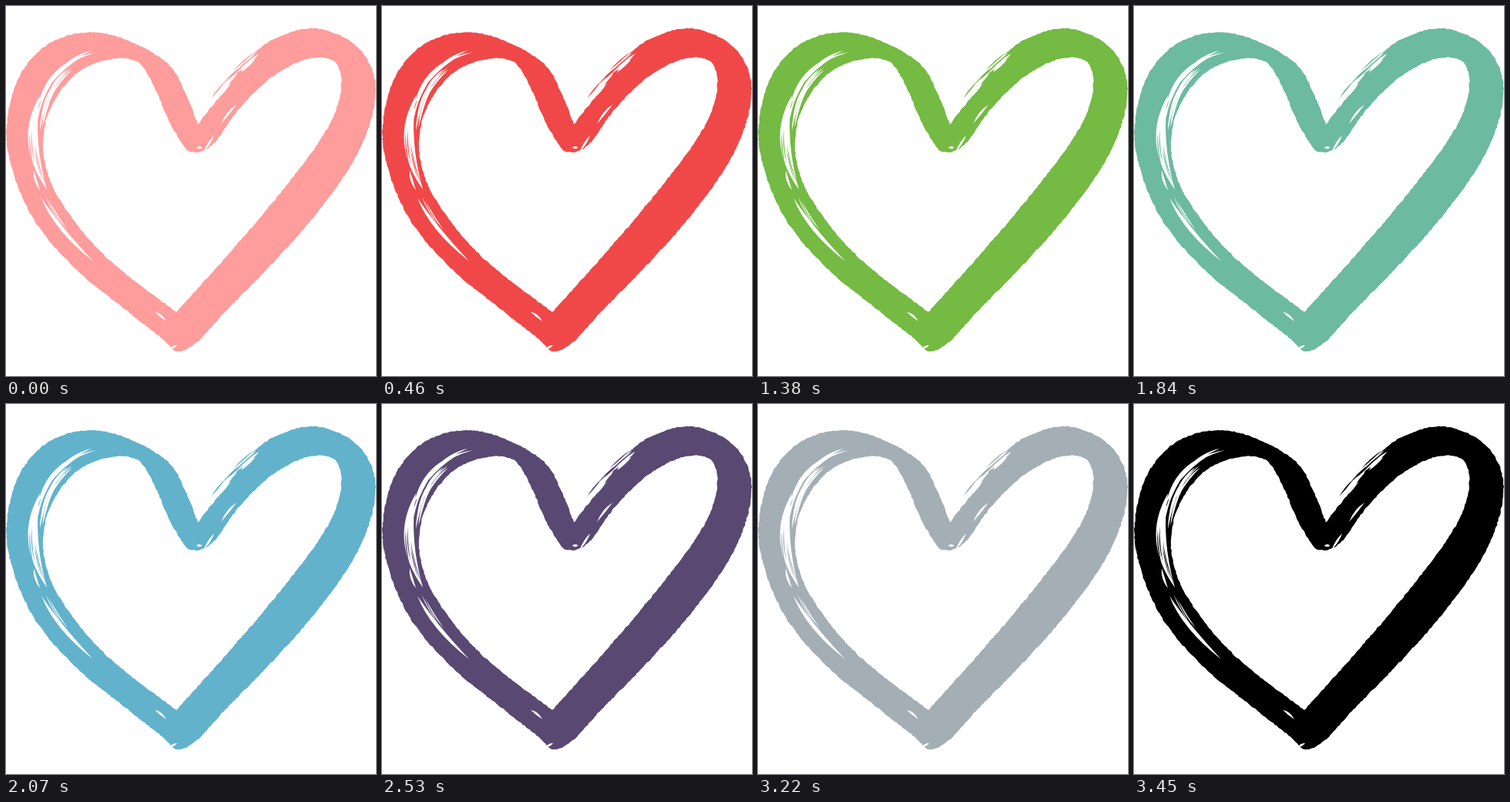
Write an HTML page with a canvas that moves like this. It is 480x480 px and loops after 3680 ms.

```html
<!DOCTYPE html>
<html lang="en">
<head>
<meta charset="utf-8">
<title>Brush heart</title>
<style>
html, body { margin: 0; width: 100%; height: 100%; overflow: hidden; background: #fff; }
canvas { display: block; width: 480px; height: 480px; }
</style>
</head>
<body>
<canvas id="stage" width="480" height="480"></canvas>
<script>
const ctx = document.getElementById('stage').getContext('2d');
const STEP = 230;
const COLORS = [
  '#ff9c9c', '#ff7474', '#f04848', '#f8603c',
  '#ff812d', '#ffc23a', '#74ba43', '#4fa35a',
  '#6cbaa0', '#62b2cc', '#4a78b4', '#594872',
  '#8c6aa6', '#b490a8', '#a3afb5', '#000000'
];

// Key points of the two edges; a repeated point makes a sharp corner.
const OUTER = [
  [249, 153], [249, 153], [280, 114], [318, 65], [352, 41], [398, 29], [446, 45],
  [475, 82], [477, 133], [453, 197], [403, 269], [340, 340], [285, 396], [248, 436],
  [222, 448], [203, 432], [150, 390], [90, 341], [38, 280], [8, 212], [1, 155],
  [17, 92], [57, 48], [115, 34], [170, 50], [212, 77], [232, 111]
];
const INNER = [
  [243, 190], [230, 181], [211, 148], [196, 113], [182, 86], [168, 71], [135, 69],
  [92, 87], [59, 130], [48, 178], [57, 226], [82, 270], [118, 314], [162, 353],
  [221, 397], [221, 397], [268, 345], [330, 274], [395, 192], [426, 140], [435, 97],
  [424, 71], [390, 69], [344, 93], [302, 134], [268, 180]
];

let seed = 41;
function rand(min, max) {
  seed = (seed * 16807) % 2147483647;
  return min + (max - min) * seed / 2147483647;
}

function spline(a, b, c, d, u) {
  return 0.5 * (2 * b + (c - a) * u + (2 * a - 5 * b + 4 * c - d) * u * u +
    (3 * b - a - 3 * c + d) * u * u * u);
}

// Closed smooth outline with a slightly ragged edge.
function addOutline(path, pts) {
  const n = pts.length;
  const at = i => pts[(i + n) % n];
  pts.forEach((p, i) => {
    const [a, c, d] = [at(i - 1), at(i + 1), at(i + 2)];
    const steps = Math.max(1, Math.round(Math.hypot(c[0] - p[0], c[1] - p[1]) / 3));
    for (let s = 0; s < steps; s++) {
      const [x, y] = [0, 1].map(k =>
        spline(a[k], p[k], c[k], d[k], s / steps) + rand(-0.6, 0.6));
      if (i || s) path.lineTo(x, y);
      else path.moveTo(x, y);
    }
  });
  path.closePath();
}

// Curved streak that tapers at both ends.
function addStreak(path, [x1, y1], [cx, cy], [x2, y2], width) {
  const len = Math.hypot(x2 - x1, y2 - y1);
  const nx = (y1 - y2) / len * width, ny = (x2 - x1) / len * width;
  path.moveTo(x1, y1);
  path.quadraticCurveTo(cx + nx, cy + ny, x2, y2);
  path.quadraticCurveTo(cx - nx, cy - ny, x1, y1);
  path.closePath();
}

// Random short streaks running beside a quadratic guide.
function addBristles(path, guide, count, spread, size, width) {
  const [a, b, c] = guide;
  for (let i = 0; i < count; i++) {
    const from = rand(0, 1 - size), off = rand(-spread, spread);
    const point = t => {
      const dx = (1 - t) * (b[0] - a[0]) + t * (c[0] - b[0]);
      const dy = (1 - t) * (b[1] - a[1]) + t * (c[1] - b[1]);
      const len = Math.hypot(dx, dy);
      const pos = k => (1 - t) ** 2 * a[k] + 2 * t * (1 - t) * b[k] + t * t * c[k];
      return [pos(0) - dy / len * off, pos(1) + dx / len * off];
    };
    const p = point(from), m = point(from + size / 2), q = point(from + size);
    const bend = [0, 1].map(k => 2 * m[k] - (p[k] + q[k]) / 2);
    addStreak(path, p, bend, q, rand(0.5, 1) * width);
  }
}

const body = new Path2D(), gaps = new Path2D(), hairs = new Path2D();
addOutline(body, OUTER);
addOutline(body, INNER);

// Dry brush on the left side
addStreak(gaps, [44, 116], [22, 175], [53, 238], 13);
addStreak(gaps, [118, 60], [52, 74], [40, 138], 4);
addStreak(gaps, [46, 249], [66, 288], [113, 331], 5);
addStreak(gaps, [36, 213], [37, 226], [44, 239], 3);
addBristles(gaps, [[124, 60], [50, 78], [42, 165]], 16, 6, 0.35, 3);
addBristles(gaps, [[45, 235], [62, 285], [108, 326]], 4, 4, 0.4, 1.5);
addBristles(hairs, [[42, 130], [25, 180], [52, 240]], 5, 5, 0.4, 1.5);

// Dry brush on the right lobe, the notch and the tip
addBristles(gaps, [[264, 132], [290, 92], [332, 59]], 12, 4, 0.25, 3);
addBristles(hairs, [[262, 126], [286, 89], [340, 48]], 5, 2, 0.3, 2);
addStreak(gaps, [299, 128], [288, 138], [279, 153], 3);
addStreak(gaps, [270, 168], [264, 177], [256, 190], 3);
addBristles(gaps, [[236, 190], [247, 186], [258, 185]], 3, 3, 0.3, 3);
addStreak(gaps, [193, 397], [201, 401], [208, 409], 3);
addStreak(gaps, [212, 446], [217, 442], [222, 440], 3);

function paint(color) {
  const layer = (fill, path) => {
    ctx.fillStyle = fill;
    ctx.fill(path, path === body ? 'evenodd' : 'nonzero');
  };
  ctx.fillStyle = '#fff';
  ctx.fillRect(0, 0, 480, 480);
  layer(color, body);
  layer('#fff', gaps);
  layer(color, hairs);
}

const start = performance.now();
function tick() {
  const t = Math.max(0, performance.now() - start);
  paint(COLORS[Math.floor(t / STEP) % COLORS.length]);
  requestAnimationFrame(tick);
}
tick();
</script>
</body>
</html>
```
